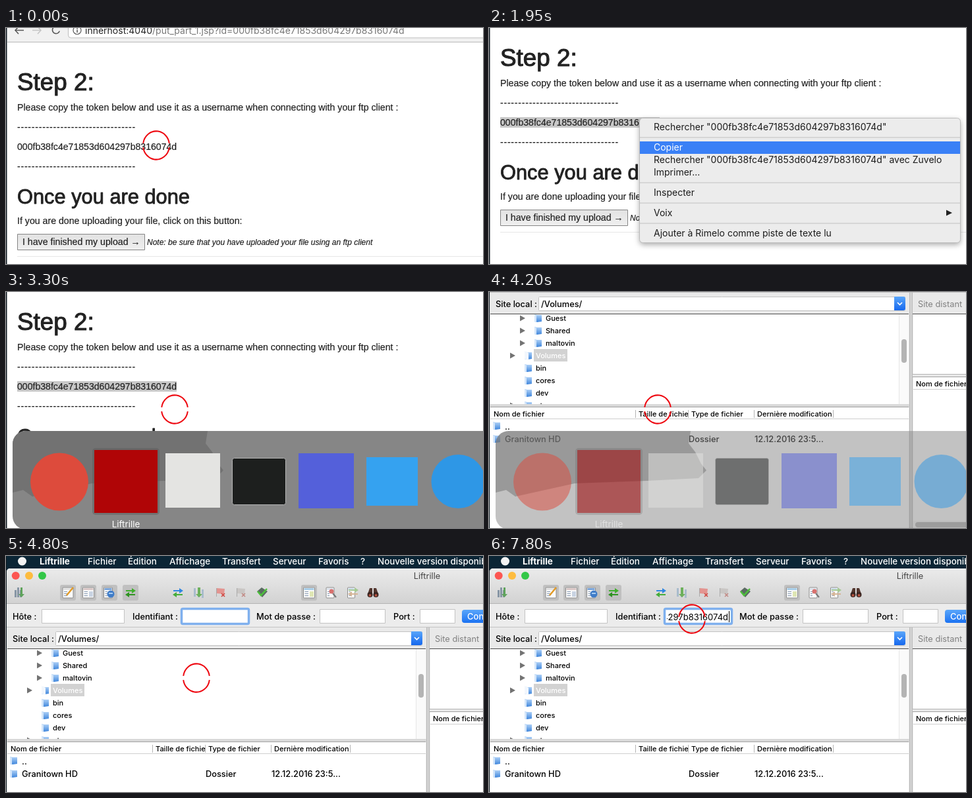
An HTML page with a canvas for the animation above (8000 ms loop, 724 px wide and 360 px high).

```html
<!DOCTYPE html>
<html lang="fr">
<head>
<meta charset="utf-8">
<title>Upload walkthrough</title>
<style>
html, body { margin: 0; width: 100%; height: 100%; overflow: hidden; background: #fff; }
canvas { display: block; }
</style>
</head>
<body>
<canvas id="stage" width="724" height="360"></canvas>
<script>
const ctx = document.getElementById('stage').getContext('2d');
const W = 724, H = 360, LOOP = 8000;
const PAGE = '"Liberation Sans", Arial, sans-serif';
const UI = 'Inter, Roboto, sans-serif';
const TOKEN = '000fb38fc4e71853d604297b8316074d';
const HOST = 'innerhost:4040';
const APP = 'Liftrille';

// Each step overrides part of the state and holds until the next one.
const STEPS = [
  [0, { view: 'page', scroll: 0, ring: [228, 179, 20] }],
  [300, { selected: true }],
  [1350, { menu: 1 }],
  [1650, { scroll: 15, ring: [238, 179, 20], hover: 188 }],
  [1800, { scroll: 33, ring: [252, 179, 20], hover: 219 }],
  [1950, { scroll: 37, ring: [256, 179, 20] }],
  [2400, { menu: 0.5 }],
  [2550, { menu: 0 }],
  [3300, { switcher: 1 }],
  [4200, { view: 'client', scroll: 108, switcher: 0.5 }],
  [4350, { switcher: 0 }],
  [4650, { scroll: 50, ring: [268, 180, 20] }],
  [4800, { scroll: 0, ring: [289, 186, 20] }],
  [4950, { ring: [300, 108, 20], caret: true }],
  [5100, { ring: [296.5, 85.5, 30] }],
  [5400, { caret: false }],
  [5550, { caret: true }],
  [6150, { caret: false }],
  [6450, { caret: true }],
  [7050, { caret: false, ring: [308, 95, 20] }],
  [7200, { caret: true, ring: [308, 96, 20] }],
  [7800, { pasted: true }]
];

function stateAt(t) {
  return Object.assign({}, ...STEPS.filter(s => s[0] <= t).map(s => s[1]));
}

function rect(x, y, w, h, fill) {
  ctx.fillStyle = fill;
  ctx.fillRect(x, y, w, h);
}

function box(x, y, w, h, r, fill, stroke, lw = 1) {
  ctx.beginPath();
  ctx.roundRect(x, y, w, h, r);
  if (fill) { ctx.fillStyle = fill; ctx.fill(); }
  if (stroke) { ctx.strokeStyle = stroke; ctx.lineWidth = lw; ctx.stroke(); }
}

function disc(x, y, r, fill) {
  ctx.beginPath();
  ctx.arc(x, y, r, 0, 7);
  ctx.fillStyle = fill;
  ctx.fill();
}

function poly(points, fill) {
  ctx.beginPath();
  points.forEach(p => ctx.lineTo(...p));
  ctx.closePath();
  ctx.fillStyle = fill;
  ctx.fill();
}

function line(points, color, lw = 1.5) {
  ctx.beginPath();
  points.forEach(p => ctx.lineTo(...p));
  ctx.strokeStyle = color;
  ctx.lineWidth = lw;
  ctx.stroke();
}

function grad(y0, y1, top, bottom) {
  const g = ctx.createLinearGradient(0, y0, 0, y1);
  g.addColorStop(0, top);
  g.addColorStop(1, bottom);
  return g;
}

function write(str, x, y, font, fill, align = 'left') {
  ctx.font = font;
  ctx.fillStyle = fill;
  ctx.textAlign = align;
  ctx.fillText(str, x, y);
}

// Interface text, centred vertically on cy.
function label(str, x, cy, size = 12.8, fill = '#000', weight = 500, align = 'left') {
  write(str, x, cy + size * 0.36, `${weight} ${size}px ${UI}`, fill, align);
}

// Web page text, thickened by an outline.
function pageText(str, x, y, size = 14.17, weight = 0.2, style = '') {
  write(str, x, y, `${style} ${size}px ${PAGE}`, '#222');
  ctx.strokeStyle = '#222';
  ctx.lineWidth = weight;
  ctx.lineJoin = 'round';
  ctx.strokeText(str, x, y);
  ctx.lineJoin = 'miter';
}

function clipped(x, y, w, h, draw) {
  ctx.save();
  ctx.beginPath();
  ctx.rect(x, y, w, h);
  ctx.clip();
  draw();
  ctx.restore();
}

function faded(alpha, draw) {
  if (!alpha) return;
  ctx.save();
  ctx.globalAlpha = alpha;
  draw();
  ctx.restore();
}

function browserBar() {
  rect(0, 0, W, 22, '#f1f1f1');
  rect(0, 21, W, 1, '#b8b8b8');
  line([[19, -2], [14, 3.5], [19, 9]], '#555');
  line([[14, 3.5], [27, 3.5]], '#555');
  line([[48, -2], [53, 3.5], [48, 9]], '#c4c4c4');
  line([[40, 3.5], [53, 3.5]], '#c4c4c4');
  ctx.beginPath();
  ctx.arc(76, 3, 5.5, 0.3, 5.5);
  ctx.strokeStyle = '#555';
  ctx.lineWidth = 1.6;
  ctx.stroke();
  box(94.5, -10, 650, 25, 4, '#fff', '#bdbdbd');
  ctx.beginPath();
  ctx.arc(108, 3.5, 6, 0, 7);
  ctx.strokeStyle = '#555';
  ctx.lineWidth = 1.2;
  ctx.stroke();
  rect(107.3, 2.5, 1.5, 4.5, '#555');
  rect(107.3, 0, 1.5, 1.5, '#555');
  label(HOST, 120, 3.5, 14, '#222', 400);
  const x = 120 + ctx.measureText(HOST).width;
  label('/put_part_1.jsp?id=' + TOKEN, x, 3.5, 14, '#777', 400);
}

function page(s) {
  browserBar();
  pageText('Step 2:', 17, 95, 36.8, 1.1);
  pageText('Please copy the token below and use it as a username when connecting with your ftp client :', 17, 126);
  ctx.letterSpacing = '0.74px';
  for (const y of [156, 216]) pageText('-'.repeat(33), 17, y);
  ctx.letterSpacing = '0px';
  if (s.selected) rect(17, 173, 242, 16, '#c8c8c8');
  pageText(TOKEN, 17, 186, 14.1);
  pageText('Once you are done', 17, 268, 30.8, 0.9);
  pageText('If you are done uploading your file, click on this button:', 17, 299);
  box(17.5, 314.5, 193, 24, 0, grad(314, 339, '#e2e2e2', '#f0f0f0'), '#858585');
  pageText('I have finished my upload →', 25, 331);
  pageText('Note: be sure that you have uploaded your file using an ftp client', 214, 331, 12, 0.2, 'italic');
  rect(17, 348, W, 1, '#e6e6e6');
}

function contextMenu(hover) {
  const search = `Rechercher "${TOKEN}"`;
  const items = [[188, search], [219, 'Copier'], [238, search + ' avec Zuvelo'], [257, 'Imprimer...'],
    [288, 'Inspecter'], [319, 'Voix'], [350, 'Ajouter à Rimelo comme piste de texte lu']];
  ctx.save();
  ctx.shadowColor = 'rgba(0,0,0,.35)';
  ctx.shadowBlur = 9;
  ctx.shadowOffsetY = 3;
  box(228.5, 174.5, 487, 190, 5, '#ececec');
  ctx.restore();
  box(228.5, 174.5, 487, 190, 5, null, '#bcbcbc');
  for (const y of [203, 272, 303, 334]) rect(229, y, 486, 2, '#d6d6d6');
  for (const [y, str] of items) {
    const on = y === hover;
    if (on) rect(229, y - 9, 486, 19, '#3a80f6');
    label(str, 250, y, 14, on ? '#fff' : '#1c1c1c', 400);
  }
  poly([[694, 314.5], [703, 319], [694, 323.5]], '#222');
}

function appSwitcher() {
  box(10, 212, 780, 150, 20, '#868686');
  ctx.save();
  ctx.beginPath();
  ctx.roundRect(10, 212, 780, 150, 20);
  ctx.clip();
  poly([[10, 212], [306, 212], [303, 231], [313, 244], [322, 262], [330, 272], [318, 284],
    [240, 288], [130, 292], [40, 312], [26, 302], [10, 306]], '#727272');
  ctx.restore();
  box(131, 238, 102, 102, 5, 'rgba(90,90,90,.45)');
  disc(81, 289.5, 44, '#dd4b3c');
  rect(134, 241, 96, 96, '#b00506');
  rect(242, 246, 83, 83, '#e4e4e2');
  box(343.5, 253.5, 81, 71, 3, '#1d1f1e', '#b4b4b4');
  rect(444, 246, 84, 84, '#5460da');
  rect(547, 252, 78, 74, '#35a2f0');
  disc(686.5, 289, 41, '#2e97e6');
  label(APP, 182, 354, 13.5, '#fff', 400, 'center');
}

function folder(x, y) {
  poly([[x, y - 6], [x + 4, y - 5], [x + 11, y - 5], [x + 11, y + 5], [x + 4, y + 6], [x, y + 5]],
    grad(y - 6, y + 6, '#b5d5f8', '#3f86dc'));
  poly([[x, y - 6], [x + 3, y - 4], [x + 3, y + 6], [x, y + 5]], '#d4e6fa');
}

function arrowPair(x, y, up, down) {
  poly([[x - 7, y - 4], [x + 2, y - 4], [x + 2, y - 7], [x + 8, y - 3], [x + 2, y + 1], [x + 2, y - 2], [x - 7, y - 2]], up);
  poly([[x + 7, y + 2], [x - 2, y + 2], [x - 2, y - 1], [x - 8, y + 3], [x - 2, y + 7], [x - 2, y + 4], [x + 7, y + 4]], down);
}

function sheet(x, y, tint, w = 16) {
  box(x - w / 2, y - 8, w, 16, 1, '#fafafa', '#8c8c8c');
  rect(x - w / 2 + 1, y - 7, w - 2, 3, tint);
  for (let i = 0; i < 3; i++) rect(x - w / 2 + 2, y - 2 + i * 3, w / 2 - 3, 1, '#8296b0');
}

function flag(x, y, fill, cross) {
  poly([[x - 6, y - 7], [x + 6, y - 6], [x + 5, y + 2], [x - 6, y + 1]], fill);
  rect(x - 7, y - 7, 1, 13, '#aaa');
  line([[x + 1, y + 1], [x + 6, y + 6]], cross, 1.6);
  line([[x + 6, y + 1], [x + 1, y + 6]], cross, 1.6);
}

function toolbar() {
  const y = 56;
  for (const x of [94, 125, 157, 189, 460]) box(x - 12, 44, 24, 24, 3, '#c0c0c0');
  for (let i = 0; i < 3; i++) rect(13 + i * 4, 52 - i % 2 * 4, 3, 11 + i % 2 * 4, '#8796a5');
  poly([[22, 48], [25, 48], [25, 58], [28, 58], [23.5, 63], [19, 58], [22, 58]], '#5fa35c');
  sheet(94, y, '#e3e3e3');
  line([[92, 60], [102, 48]], '#e29a26', 2.5);
  sheet(125, y, '#dcc9c8', 17);
  rect(126, 54, 6, 8, '#c9d3e2');
  sheet(155, y, '#7ba6dc', 13);
  disc(159, 58, 5.5, '#3f7cc8');
  rect(156, 56, 6, 2, '#a8cdf2');
  arrowPair(189, y, '#3faf2c', '#2e9320');
  arrowPair(261, y, '#2f86e2', '#46ad3a');
  for (let i = 0; i < 3; i++) rect(285 + i * 6, 49 + i, 3, 13, '#a9bccd');
  poly([[291, 48], [295, 48], [295, 58], [298, 58], [293, 63], [288, 58], [291, 58]], '#6db05c');
  flag(326, y, '#e39490', '#d2453f');
  flag(357, y, '#c9c6c4', '#c28a84');
  poly([[381, 54], [388, 48], [397, 54], [389, 63]], '#5b6b62');
  line([[382, 54], [387, 60], [396, 50]], '#4cc13a', 2.5);
  sheet(460, y, '#a9cfea', 17);
  rect(461, 54, 6, 8, '#dfe6b4');
  sheet(492, y, '#dfe5ee', 12);
  disc(494, 54, 3.5, '#d8716e');
  line([[496, 57], [501, 63]], '#777', 2);
  sheet(524, y, '#cfe0ee', 11);
  arrowPair(527, 55, '#a5c993', '#d5b597');
  for (const side of [-1, 1]) {
    poly([[557 + side, 49], [557 + side * 5, 49], [557 + side * 8, 58], [557 + side, 58]], '#53372f');
    disc(557 + side * 4.5, 59, 4, '#3a2622');
    disc(557 + side * 4.5, 60, 2, '#b3513f');
  }
}

function field(x, w) {
  box(x + 0.5, 81.5, w - 1, 21, 0, '#fff', '#c3c3c3');
}

function quickConnect(s) {
  rect(1, 73, W, 36, '#ececec');
  label('Hôte :', 10, 92);
  field(54, 126);
  label('Identifiant :', 192, 92);
  box(266.5, 80.5, 102, 23, 2, '#fff', '#7fb0ee', 3.5);
  clipped(270, 82, 96, 20, () => {
    if (s.pasted) label(TOKEN, 363, 93, 13, '#000', 400, 'right');
  });
  if (s.caret) rect(s.pasted ? 364 : 272, 84, 1, 17, '#000');
  label('Mot de passe :', 380, 92);
  field(476, 100);
  label('Port :', 588, 92);
  field(628, 54);
  box(692, 82, 160, 20, 4, grad(82, 102, '#5aa6fa', '#1b72f2'));
  label('Connexion rapide', 700, 92, 13, '#fff');
}

function tree() {
  const rows = [['Guest', 86], ['Shared', 86], ['maltovin', 86], ['Volumes', 71],
    ['bin', 71], ['cores', 71], ['dev', 71], ['etc', 71]];
  rect(2, 141, 635, 138, '#fff');
  clipped(2, 142, 635, 137, () => {
    rows.forEach(([name, x], i) => {
      const y = 148 + i * 19, on = name === 'Volumes';
      if (on) rect(68, 195, 51, 19, '#d2d2d2');
      folder(x - 17, y);
      if (on) poly([[54, 198], [60, 201], [60, 212], [54, 210]], '#f2f7fd');
      label(name, x, y, 11, on ? '#fff' : '#000');
      if (i < 4 || name === 'etc') {
        const tx = x === 86 ? 47 : 32;
        poly([[tx, y - 4.5], [tx + 8, y], [tx, y + 4.5]], '#737373');
      }
    });
  });
  rect(622, 142, 15, 137, '#fafafa');
  rect(622, 142, 1, 137, '#e6e6e6');
  box(626, 180, 8, 36, 4, '#b4b4b4');
  rect(2, 141, 635, 1, '#4c4c4c');
}

function fileList() {
  rect(2, 284, 635, 220, '#fff');
  rect(2, 283, 635, 1, '#a2a2a2');
  rect(2, 301, 635, 1, '#cfcfcf');
  label('Nom de fichier', 7, 294, 11);
  clipped(224, 284, 79, 18, () => label('Taille de fichier', 227, 294, 11));
  label('Type de fichier', 307, 294, 11);
  label('Dernière modification', 407, 294, 11);
  for (const x of [222, 302, 402, 522]) rect(x, 288, 1, 12, '#b4b4b4');
  folder(6, 312);
  label('..', 24, 313);
  folder(6, 332);
  label('Granitown HD', 24, 332);
  label('Dossier', 303, 332);
  label('12.12.2016 23:5...', 403, 332);
}

function remotePane() {
  rect(638, 109, 4, 400, '#d3d3d3');
  rect(638, 109, 1, 400, '#b9b9b9');
  rect(642, 109, 1, 400, '#b9b9b9');
  label('Site distant', 651, 126, 12.8, '#808080', 400);
  rect(644, 142, 90, 91, '#fff');
  rect(643, 141, 90, 1, '#4c4c4c');
  rect(643, 233, 90, 1, '#b5b5b5');
  rect(644, 238, 90, 240, '#fff');
  rect(643, 237, 90, 1, '#a2a2a2');
  rect(644, 256, 90, 1, '#cfcfcf');
  label('Nom de fichier', 648, 248, 11);
  rect(644, 457, 90, 14, '#f8f8f8');
  box(647, 459, 100, 8, 4, '#b4b4b4');
}

function menuBar() {
  rect(0, 0, W, 30, '#0b2535');
  disc(24.5, 8, 6.5, '#f4f4f4');
  label(APP, 51, 8.5, 13.6, '#fff', 700);
  const items = [['Fichier', 124], ['Édition', 185], ['Affichage', 248], ['Transfert', 328], ['Serveur', 405],
    ['Favoris', 474], ['?', 538], ['Nouvelle version disponible', 564]];
  for (const [str, x] of items) label(str, x, 8.5, 13.4, '#fff');
}

function client(s) {
  menuBar();
  box(1, 19, 900, 700, [5, 0, 0, 0], '#e9e9e9');
  box(1, 19, 900, 54, [5, 0, 0, 0], grad(19, 73, '#ebebeb', '#d2d2d2'));
  rect(1, 72, W, 1, '#b4b4b4');
  disc(14.7, 30, 6, '#fc5652');
  disc(35, 30, 6, '#fdbc3f');
  disc(55, 30, 6, '#33c748');
  label(APP, 639, 30, 12.8, '#444', 400, 'center');
  toolbar();
  quickConnect(s);
  rect(1, 108, W, 1, '#c4c4c4');
  label('Site local :', 10, 126);
  box(75.5, 115.5, 556, 21, 1, '#fff', '#c3c3c3');
  box(615, 115, 17, 21, [0, 3, 3, 0], grad(115, 136, '#5aa6fa', '#1668ee'));
  line([[620, 124], [623.5, 127.5], [627, 124]], '#fff', 1.7);
  label('/Volumes/', 79, 126);
  rect(1, 279, 637, 5, '#d9d9d9');
  tree();
  fileList();
  remotePane();
}

function ring([x, y, r]) {
  const gap = 0.14;
  ctx.strokeStyle = '#ee0710';
  ctx.lineWidth = 2;
  for (const start of [0, Math.PI]) {
    ctx.beginPath();
    ctx.ellipse(x, y, r, r * 1.08, 0, start + gap, start + Math.PI - gap);
    ctx.stroke();
  }
}

function scrolled(s, draw) {
  ctx.save();
  ctx.translate(0, -s.scroll);
  draw(s);
  ctx.restore();
}

function render(t) {
  const s = stateAt(t);
  rect(0, 0, W, H, '#fff');
  scrolled(s, s.view === 'page' ? page : client);
  if (s.view === 'page') rect(1, 0, 1, H, '#8d9196');
  rect(0, 0, 1, H, '#0d1820');
  ring(s.ring);
  faded(s.menu, () => scrolled(s, () => contextMenu(s.hover)));
  faded(s.switcher, appSwitcher);
}

function tick() {
  render(performance.now() % LOOP);
  requestAnimationFrame(tick);
}
tick();
</script>
</body>
</html>
```
